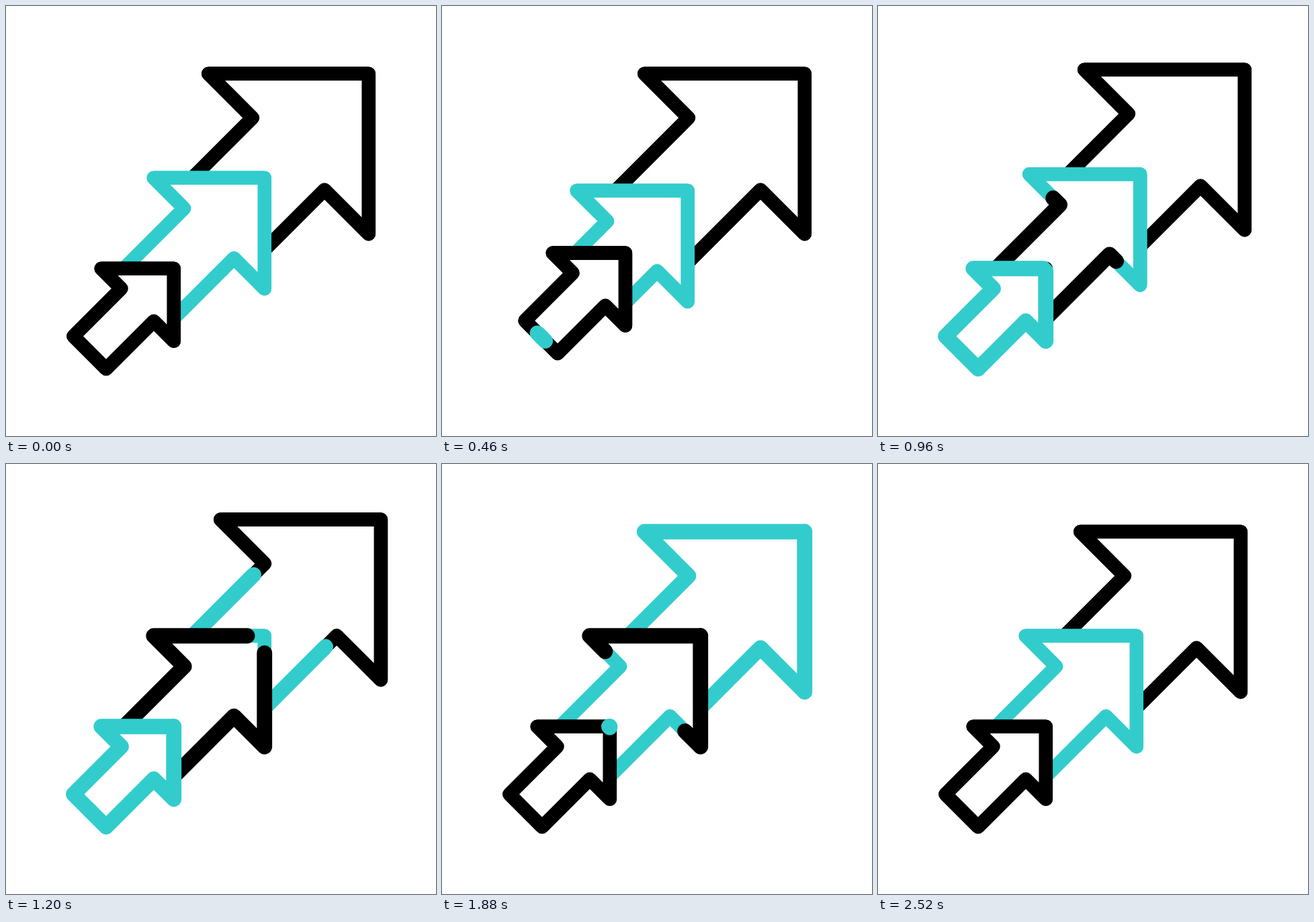
Animation of 640 by 640 pixels, one loop 2.82 s. Source, as an HTML page with a canvas:

```html
<!DOCTYPE html>
<html>
<head>
<meta charset="utf-8">
<style>
  html, body { margin: 0; width: 100%; height: 100%; overflow: hidden; background: #fff; }
  canvas { display: block; }
</style>
</head>
<body>
<canvas id="stage" width="640" height="640"></canvas>
<script>
const ctx = document.getElementById('stage').getContext('2d');
const BLACK = '#000', TEAL = '#33cccc';
const LOOP = 2820, STAGGER = 300;
const SWING = 240, DIP = 25.6;              // each leg of the down-up-back move
const GROW = 400, SHRINK = 1305, TRIM = 600; // recolouring along the outline
const AXIS = 640.5;                          // arrows are symmetric about x + y = AXIS

// Smallest arrow first: x of the tip, side of the head, height of the leap.
const arrows = [
  { tip: 249.75, head: 108, leap: 24, color: BLACK, accent: TEAL },
  { tip: 384.75, head: 165, leap: 35.5, color: TEAL, accent: BLACK },
  { tip: 539.75, head: 238.5, leap: 36.7, color: BLACK, accent: TEAL }
];

const mirror = ([x, y]) => [AXIS - y, AXIS - x];
const move = ([x, y], d) => [x + d, y - d];

const ease = p => {
  p = Math.min(1, Math.max(0, p));
  return p * p * (3 - 2 * p);
};

function shiftAt(t, leap) {
  const leg = n => ease(t / SWING - n);
  return -DIP * leg(0) + (DIP + leap) * leg(1) - leap * leg(2);
}

// Half of the outline, tail to tip. Larger arrows start behind the smaller one.
function halfOutline({ tip, head }, shift, smaller, smallerShift) {
  const top = AXIS - tip, barb = head * 0.2755, width = head / 2 - barb;
  const notch = [tip - head + barb, top + barb];
  const front = [notch, [tip - head, top], [tip, top]].map(p => move(p, shift));
  const run = smaller ? AXIS - smaller.tip - 2 - notch[1] : 71;
  const corner = move(move(notch, -run), smaller ? smallerShift : shift);
  const middle = [corner[0] + width, corner[1] + width];
  return smaller ? [corner, ...front] : [middle, corner, ...front];
}

const pathLength = pts => pts.slice(1).reduce(
  (sum, [x, y], i) => sum + Math.hypot(x - pts[i][0], y - pts[i][1]), 0);

function stroke(pts, color, width) {
  ctx.beginPath();
  pts.forEach(([x, y]) => ctx.lineTo(x, y));
  ctx.strokeStyle = color;
  ctx.lineWidth = width;
  ctx.stroke();
}

function drawArrow({ color, accent }, half, t) {
  const other = half.map(mirror);
  ctx.setLineDash([]);
  stroke([...half, ...other.slice().reverse()], color, 20.6);
  ctx.fill();
  stroke([...half, ...other.slice().reverse()], color, 20.6);

  const length = pathLength(half);
  const from = length * ease((t - SHRINK) / TRIM);
  const to = length * ease((t - GROW) / TRIM);
  if (to - from < 0.01) return;
  ctx.setLineDash([to - from, length * 2]);
  ctx.lineDashOffset = -from;
  for (const side of [half, other]) stroke(side, accent, 22.8);
}

function draw(time) {
  ctx.fillStyle = '#fff';
  ctx.fillRect(0, 0, 640, 640);
  ctx.lineCap = ctx.lineJoin = 'round';
  const shifts = arrows.map((a, i) => shiftAt(time - i * STAGGER, a.leap));
  for (let i = arrows.length - 1; i >= 0; i--) {
    const half = halfOutline(arrows[i], shifts[i], arrows[i - 1], shifts[i - 1]);
    drawArrow(arrows[i], half, time - i * STAGGER);
  }
}

const start = performance.now();
function tick() {
  draw((performance.now() - start) % LOOP);
  requestAnimationFrame(tick);
}
tick();
</script>
</body>
</html>
```
